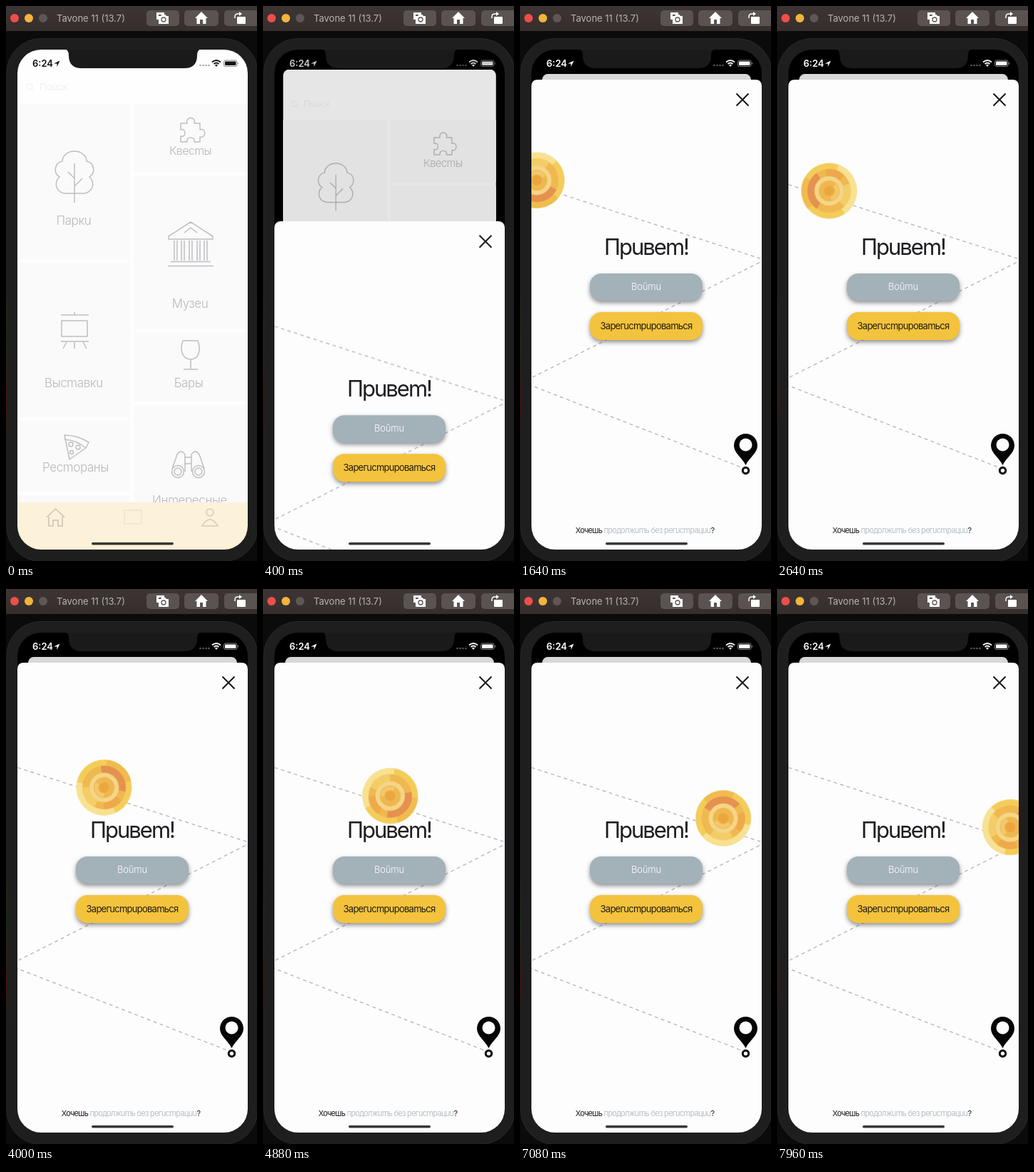
Animation of 352 by 776 pixels, one loop 8 s. Source, as an HTML page:

```html
<!DOCTYPE html>
<html lang="bg">
<head>
<meta charset="utf-8">
<title>Welcome sheet</title>
<style>
html, body { margin: 0; width: 100%; height: 100%; overflow: hidden; background: #0b0b0b; }
svg { display: block; width: 100vw; height: 100vh; }
text { font-family: Inter, "Open Sans", sans-serif; }
.mid { text-anchor: middle; }
.label { font-size: 17px; font-weight: 300; letter-spacing: -.4px; fill: #b9b9bb; }
.line { fill: none; stroke: #bfbfc2; stroke-width: 1.5; stroke-linejoin: round; }
.gap { fill: #fafafb; }
.button { filter: drop-shadow(0 3px 3px rgba(30, 30, 35, .5)); }

.home, .dim, .sheet, .status, .ball, .spin { animation: 8s linear infinite; }
.home { animation-name: shrink; transform-origin: 177.5px 61px; }
.dim { animation-name: dim; }
.sheet { animation-name: rise; }
.status { animation-name: invert; }
.ball { animation-name: travel; }
.spin { animation-name: spin; }

@keyframes rise {
  0%, 1.5% { transform: translateY(673px); animation-timing-function: cubic-bezier(.25, .6, .2, 1); }
  14%, 100% { transform: none; }
}
@keyframes shrink {
  0%, 1.5% { transform: none; animation-timing-function: cubic-bezier(.25, .6, .2, 1); }
  11%, 100% { transform: translateY(34px) scale(.907); }
}
@keyframes dim {
  0%, 1.5% { opacity: 0; animation-timing-function: ease-out; }
  9%, 100% { opacity: .15; }
}
@keyframes invert {
  0%, 1.5% { color: #101012; }
  6%, 100% { color: #fff; }
}
@keyframes travel {
  0% { transform: translate(-57.6px, 219.4px); }
  10.25% { transform: translate(-17px, 231.4px); }
  33% { transform: translate(73px, 258.5px); }
  50% { transform: translate(137.5px, 277.5px); }
  72.75% { transform: translate(222px, 302px); }
  88.5% { transform: translate(285px, 320.5px); }
  100% { transform: translate(329px, 333.6px); }
}
@keyframes spin {
  from { transform: rotate(-139deg); }
  to { transform: rotate(661deg); }
}
</style>
</head>
<body>
<svg viewBox="0 0 352 776" preserveAspectRatio="none">
  <defs>
    <clipPath id="screen"><rect x="16" y="61" width="323" height="699" rx="33"/></clipPath>
    <linearGradient id="bar" x2="0" y2="1">
      <stop stop-color="#3d3534"/><stop offset="1" stop-color="#352e2d"/>
    </linearGradient>
    <linearGradient id="glow" x2="0" y2="1">
      <stop stop-color="#1c2a12" stop-opacity="0"/><stop offset=".4" stop-color="#1c2a12"/>
      <stop offset=".8" stop-color="#40140c"/><stop offset="1" stop-color="#40140c" stop-opacity="0"/>
    </linearGradient>
  </defs>

  <!-- Window toolbar -->
  <rect width="352" height="776" fill="#0b0b0b"/>
  <rect width="352" height="35" fill="url(#bar)"/>
  <circle cx="12" cy="17" r="6" fill="#ee4e48"/>
  <circle cx="32" cy="17" r="6" fill="#f3b43c"/>
  <circle cx="52" cy="17" r="6" fill="#5e5756"/>
  <text x="71" y="22" font-size="13" fill="#b8b2b1">Tavone 11 (13.7)</text>
  <g fill="#5a5352">
    <rect x="197" y="6" width="46" height="22" rx="5"/>
    <rect x="250" y="6" width="48" height="22" rx="5"/>
    <rect x="306" y="6" width="52" height="22" rx="5"/>
  </g>
  <g fill="#fff">
    <path d="M211 9h11v3h-8v7h-3z"/>
    <path d="M214 14h3l1.500-2h5l1.500 2h3v11h-14z"/>
    <circle cx="221" cy="19" r="3" fill="none" stroke="#5a5352" stroke-width="1.300"/>
    <path d="M274 8l9 9h-2.500v8h-4.500v-6h-4v6h-4.500v-8H265z"/>
    <rect x="324" y="15" width="12" height="10" rx="1"/>
    <path d="M321 17v-2q0-4 4-4h3" fill="none" stroke="#fff" stroke-width="1.500"/>
    <path d="M327 8l4 3-4 3z"/>
  </g>

  <!-- Phone body -->
  <rect x="1" y="45.500" width="352" height="731" rx="48" fill="#1e1e1e" stroke="#292929"/>
  <rect y="380" width="2" height="220" fill="url(#glow)"/>

  <g clip-path="url(#screen)">
    <rect x="16" y="61" width="323" height="699"/>

    <g class="home">
      <rect x="16" y="61" width="323" height="705" rx="9" fill="#fefefe"/>
      <g class="gap">
        <rect x="16" y="137" width="158" height="217"/>
        <rect x="16" y="359" width="158" height="216"/>
        <rect x="16" y="580" width="158" height="99"/>
        <rect x="16" y="684" width="158" height="20"/>
        <rect x="179" y="137" width="160" height="95"/>
        <rect x="179" y="237" width="160" height="215"/>
        <rect x="179" y="457" width="160" height="96"/>
        <rect x="179" y="558" width="160" height="140"/>
      </g>
      <g fill="none" stroke="#efeff1">
        <circle cx="33" cy="113" r="4"/><path d="M36 116l4 4"/>
      </g>
      <text class="cursive" x="47" y="118" font-size="13" fill="#efeff1">Поиск</text>

      <g class="line">
        <path d="M84 262a13 13 0 0 1-9-23a12 12 0 0 1 4-22a17 14 0 0 1 34 0a12 12 0 0 1 4 22a13 13 0 0 1-9 23zM96 275V220M96 252l11-11M96 241l-9-9"/>
        <path d="M245 164h9c-3-10 13-10 10 0h8v9c9-3 9 13 0 10v7h-8c2-8-12-8-10 0h-9v-8c8 3 8-12 0-9z"/>
        <path d="M228 322L259 302L290 322v4h-62zM250 317l9-7 9 7M227 363.500h64M231 357.500h56"/>
        <path d="M236 328v28m4 0v-28m6 0v28m4 0v-28m7 0v28m4 0v-28m7 0v28m4 0v-28m6 0v28m4 0v-28"/>
        <path d="M78 440h36v22h-36zM77 432h39M96 428v4M77 469h39M85 470l-5 9M108 470l5 9M96 470v9"/>
        <path d="M248 468h21c5 14 1 26-10 26s-16-12-11-26zM259 494v14M249 508h20"/>
        <path d="M82 600q18 0 34 10l-4 8L89 634zM82 606q17 1 30 12"/>
        <circle cx="91" cy="613" r="3"/><circle cx="101" cy="617" r="3"/><circle cx="92" cy="624" r="2.500"/>
        <circle cx="241" cy="651" r="8.500"/><circle cx="270" cy="651" r="8.500"/>
        <circle cx="241" cy="651" r="5"/><circle cx="270" cy="651" r="5"/>
        <path d="M233 647l7-20q5-8 11 0v24M278 647l-7-20q-5-8-11 0v24M251 631h9M251 640h9"/>
      </g>
      <g class="label mid cursive">
        <text x="95" y="306">Парки</text>
        <text x="258.500" y="208" font-size="16" letter-spacing="-.6">Квесты</text>
        <text x="258" y="422">Музеи</text>
        <text x="95" y="533">Выставки</text>
        <text x="256" y="533">Бары</text>
        <text x="97.500" y="651">Рестораны</text>
        <text x="257.500" y="697">Интересные</text>
      </g>
      <rect x="16" y="694" width="323" height="72" fill="#fcf1d9"/>
      <g fill="none" stroke="#cdc5b3" stroke-width="1.600">
        <path d="M57 715l12.500-12 12.500 12M60 714v13h6v-8h7v8h6v-13"/>
        <rect x="166" y="705" width="24" height="19" stroke="#efe5cf"/>
        <g stroke="#d6cebb"><circle cx="286" cy="708" r="5"/><path d="M275 727q11-18 22 0z"/></g>
      </g>
      <rect class="dim" x="16" y="61" width="323" height="705" rx="9"/>
    </g>

    <g class="sheet">
      <path d="M16 776V112q0-9 9-9h305q9 0 9 9v664z" fill="#fdfdfd"/>
      <path d="M-20 238L343 355L4 526L313 646" fill="none" stroke="#b6b7cb" stroke-width="1.400" stroke-dasharray="5 4.500"/>
      <path d="M303.500 122.500l17 17m0-17l-17 17" stroke="#101012" stroke-width="1.800"/>

      <g class="ball"><g class="spin" fill="none">
        <circle r="39" fill="#f4cc5a"/>
        <g stroke-width="9">
          <circle r="34.500" stroke="#f8e191" pathLength="360" stroke-dasharray="125 235" transform="rotate(165)"/>
          <circle r="34.500" stroke="#f0bc4f" pathLength="360" stroke-dasharray="70 290" transform="rotate(15)"/>
        </g>
        <g stroke-width="10">
          <circle r="25.500" stroke="#f0b850"/>
          <circle r="25.500" stroke="#e5914f" pathLength="360" stroke-dasharray="110 250"/>
          <circle r="25.500" stroke="#eda94a" pathLength="360" stroke-dasharray="55 305" transform="rotate(135)"/>
          <circle r="25.500" stroke="#f3cd68" pathLength="360" stroke-dasharray="65 295" transform="rotate(215)"/>
        </g>
        <circle r="17.500" stroke="#f5d587" stroke-width="6"/>
        <circle r="14.500" fill="#efb750"/>
        <circle r="11" stroke="#f3c96c" stroke-width="5" pathLength="360" stroke-dasharray="120 240" transform="rotate(190)"/>
        <circle r="7" fill="#eba63f"/>
      </g></g>

      <g class="mid cursive">
        <text x="177" y="348" font-size="31" letter-spacing="-2" fill="#1d1d22">Привет!</text>
        <rect class="button" x="98" y="374" width="158" height="38" rx="16" fill="#a3b1b9"/>
        <rect class="button" x="98" y="428" width="158" height="39" rx="16" fill="#f4c33d"/>
        <text x="177" y="397" font-size="13" font-weight="300" letter-spacing="-.2" fill="#fff">Войти</text>
        <text x="177" y="452" font-size="13" letter-spacing="-.75" fill="#231d12">Зарегистрироваться</text>
        <text x="175" y="737" font-size="11" letter-spacing="-.7" fill="#1d1d22">Хочешь <tspan fill="#b7c0c8">продолжить без регистрации</tspan>?</text>
      </g>

      <path d="M316.500 642C311 631 300 625 300 614.500a16.500 16.500 0 0 1 33 0C333 625 322 631 316.500 642z" fill="#050505"/>
      <circle cx="316.500" cy="613.500" r="9" fill="#fdfdfd"/>
      <circle cx="316.500" cy="649.500" r="4.200" fill="#fdfdfd" stroke="#050505" stroke-width="3"/>
    </g>

    <rect x="120" y="750" width="115" height="3.500" rx="1.750" fill="#1c1c1e" opacity=".88"/>
    <path d="M80 60q8 0 8 9c0 12 6 18 18 18h144c12 0 18-6 18-18q0-9 8-9z" fill="#1a1a1a"/>

    <g class="status" fill="currentColor">
      <text x="37" y="85" font-size="13" font-weight="600">6:24</text>
      <path d="M67 80.500l8.500-4-4 8.500v-4.500z"/>
      <g opacity=".35">
        <circle cx="272.500" cy="83" r="1.300"/><circle cx="276.500" cy="83" r="1.300"/>
        <circle cx="280.500" cy="83" r="1.300"/><circle cx="284.500" cy="83" r="1.300"/>
      </g>
      <path d="M289 78.500q6-5 12 0M291.500 81q3.500-3 7 0" fill="none" stroke="currentColor" stroke-width="1.800"/>
      <path d="M293 82.500q2-1.500 4 0l-2 2.500z"/>
      <rect x="305.500" y="76" width="18.500" height="8.500" rx="2.500" fill="none" stroke="currentColor" opacity=".5"/>
      <rect x="307" y="77.500" width="15.500" height="5.500" rx="1.300"/>
      <path d="M325 78.500q1.800 1.700 0 3.500z" opacity=".6"/>
    </g>
  </g>
</svg>
<script>
// The app's typeface draws these letters in their cursive forms.
const cursive = { 'и': 'u', 'й': 'ŭ', 'т': 'm' };

function useCursive(node) {
  if (node.nodeType === Node.TEXT_NODE) {
    node.data = node.data.replace(/[ийт]/g, letter => cursive[letter]);
  } else {
    node.childNodes.forEach(useCursive);
  }
}

document.querySelectorAll('.cursive').forEach(useCursive);
</script>
</body>
</html>
```
